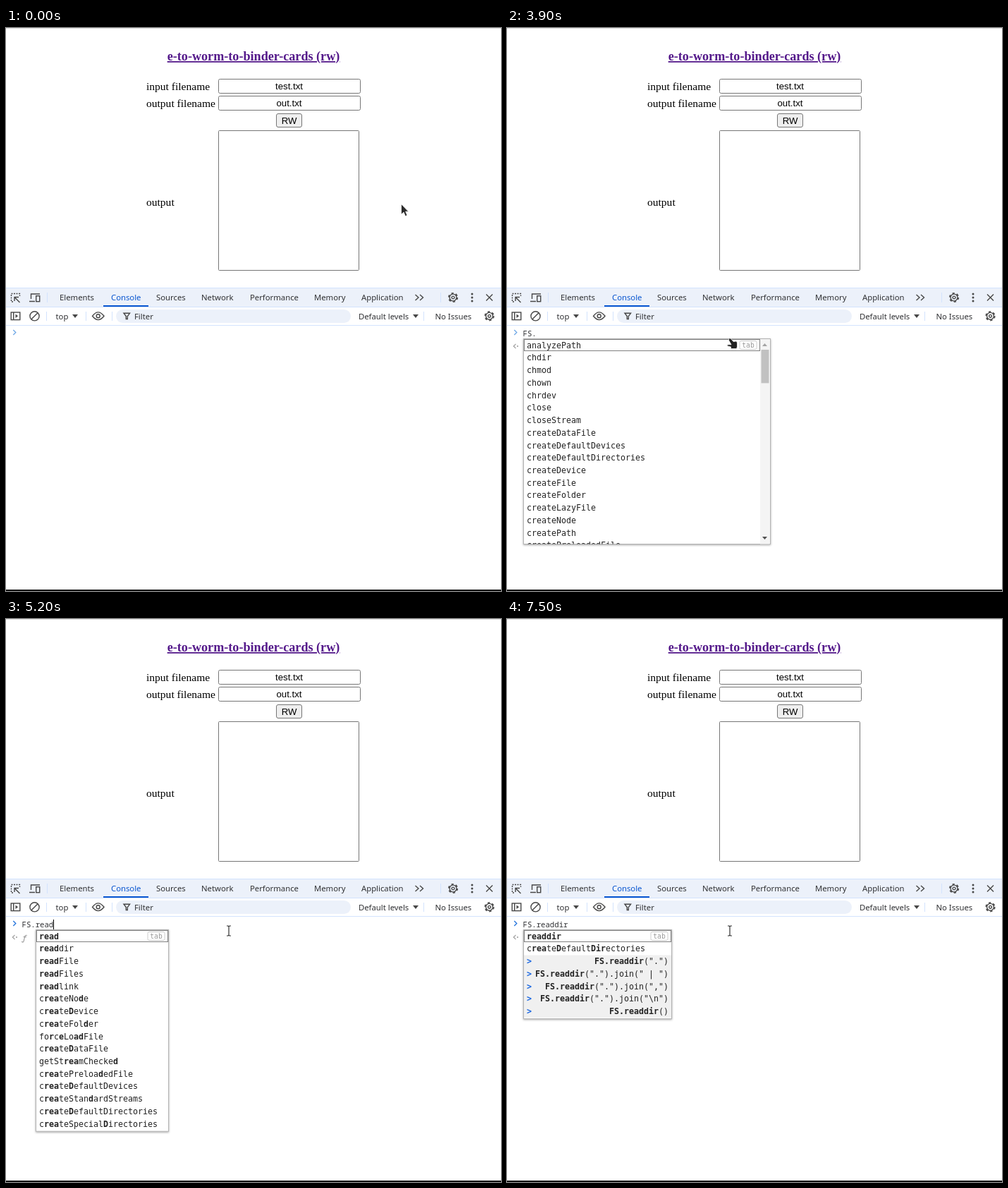
Recreate the animation shown at these times as an HTML page. Size 702 by 798 pixels, loop 8 s.

```html
<!DOCTYPE html>
<html lang="en">
<head>
<meta charset="utf-8">
<title>Console autocomplete</title>
<style>
  html, body { margin: 0; width: 100%; height: 100%; overflow: hidden; background: #fff; }
  svg { display: block; }
  text { white-space: pre; }
  .serif { font: 15.54px "Liberation Serif", serif; }
  .title { font-size: 18.15px; font-weight: bold; fill: #551a8b; text-decoration: underline; }
  .field { font: 13.2px "Liberation Sans", sans-serif; text-anchor: middle; }
  .box { stroke: #767676; }
  .ui { font: 11.3px "Noto Sans", sans-serif; fill: #303134; }
  .ui .active { fill: #0b57d0; }
  .icon { fill: none; stroke: #474747; stroke-width: 1.4; }
  .solid { fill: #474747; }
  .line { stroke: #d3e3fd; }
  .prompt { font: 10.667px "Noto Sans Mono", monospace; fill: #303134; }
  .list { font: 11.63px "DejaVu Sans Mono", monospace; fill: #222; }
  .list .hit { font-weight: bold; }
  .list .mark { font-weight: bold; fill: #1a66e0; }
  .popup { filter: drop-shadow(0 1px 1.5px rgba(0, 0, 0, .35)); }
</style>
</head>
<body>
<svg width="702" height="798" viewBox="0 0 702 798">
  <defs>
    <g id="gear" class="icon">
      <circle r="4.9"/><circle r="1.9"/>
      <circle r="6.2" stroke-width="1.8" stroke-dasharray="3.2 3.293"/>
    </g>
    <path id="down" class="solid" d="M-4-2.5h8l-4 5z"/>
    <path id="arrow" fill="#2b2b2b" stroke="#fff" stroke-width=".8"
      d="M0 0V14.8L3.5 11.6 5.8 17.2 8.5 16.1 6.2 10.7H10.3Z"/>
    <g id="ibeam" fill="none">
      <path stroke="#fff" stroke-width="3" d="M-3-7H-1L0-6 1-7H3M0-6V6M-3 7H-1L0 6 1 7H3"/>
      <path stroke="#333" stroke-width="1.2" d="M-3-7H-1L0-6 1-7H3M0-6V6M-3 7H-1L0 6 1 7H3"/>
    </g>
    <path id="hand" fill="#222" stroke="#fff" stroke-width=".7"
      d="M-.5-2Q1-2.5 2-1L5 2.5 9 2Q10.5 2.5 10.5 5V10L9.5 12.5H1.5V10L-3.5 8.8Q-4.5 6.8-2 6.8H2L-1.5.5Q-2-1.5-.5-2Z"/>
  </defs>

  <path stroke="#dedede" d="M0 .5H702"/>
  <path d="M0 796H702V798H0Z"/>
  <g class="serif">
    <text class="title" x="351" y="46" text-anchor="middle">e-to-worm-to-binder-cards (rw)</text>
    <text x="199" y="88">input filename</text>
    <text x="199" y="112">output filename</text>
    <text x="199" y="252">output</text>
  </g>
  <g class="box" fill="#fff">
    <rect x="301.5" y="72.5" width="201" height="20" rx="2"/>
    <rect x="301.5" y="96.5" width="201" height="20" rx="2"/>
    <rect x="383.5" y="121.5" width="36" height="19" rx="2.5" fill="#efefef"/>
    <rect x="301.5" y="145.5" width="199" height="198" rx="1"/>
  </g>
  <g class="field">
    <text x="401.5" y="87">test.txt</text>
    <text x="401.5" y="111">out.txt</text>
    <text x="401.5" y="136">RW</text>
  </g>

  <path fill="#ecf1fa" d="M0 368H702V395H0Z"/>
  <path class="line" d="M0 368.5H702M0 395.5H702M0 421.5H702M58.5 375V389M616.5 375V389M57.5 402V415M113.5 402V415M150.5 402V415M592.5 402V415"/>
  <path fill="#0b57d0" d="M138 393H202V395H138Z"/>
  <rect x="156" y="399" width="333" height="19" rx="9.5" fill="#ecf1fa"/>
  <g class="ui">
    <text x="76" y="386">Elements</text>
    <text x="149" y="386" class="active">Console</text>
    <text x="213" y="386">Sources</text>
    <text x="277" y="386">Network</text>
    <text x="346" y="386">Performance</text>
    <text x="437" y="386">Memory</text>
    <text x="504" y="386">Application</text>
    <text x="70.5" y="413">top</text>
    <text x="182" y="413">Filter</text>
    <text x="500" y="413">Default levels</text>
    <text x="608.5" y="413">No Issues</text>
  </g>

  <g class="icon">
    <path stroke-dasharray="2 1.5" d="M10 388H7.5V376.5H19.5V380"/>
    <path d="M12 387V381.5H18M12.5 382L19.5 389"/>
    <path d="M35.5 384V377H48M33 387.5H41"/>
    <rect x="42.7" y="379.7" width="5" height="8"/>
    <path d="M580.5 378L585 382 580.5 386M587 378L591.5 382 587 386"/>
    <path d="M681 377.5L690 386.5M690 377.5L681 386.5"/>
    <rect x="7.2" y="403" width="12.6" height="10.6"/>
    <path d="M10.7 403V414"/>
    <circle cx="40.5" cy="408.3" r="6.6"/>
    <path d="M45 403.8L36 412.8"/>
    <path d="M122.5 408.3Q130.7 397.5 139 408.3 130.7 419 122.5 408.3Z"/>
    <circle cx="130.7" cy="408.3" r="2.5"/>
    <path d="M167 404.3H175.5L172.3 408.5V412.5H170.3V408.5Z"/>
  </g>
  <path class="solid" d="M13.5 405.5V411L17 408.3Z"/>
  <g class="solid">
    <circle cx="661" cy="377" r="1.5"/><circle cx="661" cy="382" r="1.5"/><circle cx="661" cy="387" r="1.5"/>
  </g>
  <use href="#gear" x="634" y="382"/>
  <use href="#gear" x="685.5" y="408.3"/>
  <use href="#down" x="98" y="408.5"/>
  <use href="#down" x="581" y="408.5"/>

  <g id="live"></g>
</svg>
<script>
const LOOP = 8000, CHAR = 6.4, PROMPT_X = 22.5;
const LIST_CHAR = 7, ROW = 17.73, TOP = 441, MAX_HEIGHT = 291;

const words = s => s.split(' ');
const globals = words('FS FS_createDataFile FS_createDevice FS_createLazyFile FS_createPath ' +
  'FS_createPreloadedFile FS_getMode FS_handledByPreloadPlugin FS_modeStringToFlags FS_stdin_getChar ' +
  'FS_stdin_getChar_buffer FS_unlink FS_mkdirTree FileSystemHandle FileSystemFileHandle ' +
  'FileSystemDirectoryHandle FileSystemWritableFileStream');
const allMembers = words('analyzePath chdir chmod chown chrdev close closeStream createDataFile ' +
  'createDefaultDevices createDefaultDirectories createDevice createFile createFolder createLazyFile ' +
  'createNode createPath createPreloadedFile');
const members = words('read readdir readFile readFiles readlink registerDevice rename rmdir root ' +
  'createNode createDevice createFolder forceLoadFile createDataFile getStreamChecked createPreloadedFile ' +
  'createDefaultDevices createStandardStreams createDefaultDirectories createSpecialDirectories');
const history = ['FS.read("test.txt")', 'FS.readdir(".")', 'FS.readdir(".").join(" | ")',
  'FS.readdir(".").join(",")', 'FS.readdir(".").join("\\n")', 'FS.readdir()',
  ...['file', 'out.txt', 'test.txt'].map(f => `FS.readFile("${f}", { encoding: 'utf8' })`),
  'FS.rename("a.txt", "b.txt")'];

const hit = s => `<tspan class="hit">${s}</tspan>`;

// Greedy, case-insensitive subsequence match with the matched letters in bold.
function fuzzy(word, query) {
  let n = 0;
  const html = [...word].map(c =>
    n < query.length && c.toLowerCase() === query[n].toLowerCase() ? (n++, hit(c)) : c).join('');
  return { html, matches: n === query.length };
}

function search(query, withHistory = true) {
  const starts = w => w.startsWith(query);
  const loose = query.length > 1 ? members.filter(w => !starts(w) && fuzzy(w, query).matches) : [];
  return {
    query,
    items: [...members.filter(starts), ...loose],
    past: withHistory ? history.filter(h => h.startsWith('FS.' + query)) : [],
    x: withHistory ? 23 : 42
  };
}

const globalList = { query: 'FS', items: globals, past: [], x: 23, width: 350, total: 62 };
const memberList = { query: '', items: allMembers, past: [], x: 23, width: 350, total: 90 };
const grey = s => `<tspan fill="#bcbcbc">${s}</tspan>`;
const object = `{${grey('root:')} FSNode, ${grey('mounts:')} Array(1), ${grey('devices:')} {…}, ` +
  `${grey('streams:')} Array(4), ${grey('nextInode:')} <tspan fill="#7189c4">21</tspan>, …}`;
const func = '<tspan x="22" font-style="italic">ƒ</tspan>';

// time, typed text, suggestions, eager result
const steps = [
  [0, ''],
  [3000, 'F'],
  [3100, 'FS', globalList],
  [3200, 'FS.', globalList, object],
  [3300, 'FS.', memberList, object],
  [3400, 'FS.', memberList, ''],
  [4300, 'FS.r', memberList, ''],
  [4400, 'FS.r', search('r'), ''],
  [4900, 'FS.re', search('r'), ''],
  [5000, 'FS.re', search('re'), ''],
  [5100, 'FS.rea', search('rea'), ''],
  [5200, 'FS.read', search('read', false), func],
  [5300, 'FS.read', search('read'), func],
  [5500, 'FS.readd', search('read'), ''],
  [5600, 'FS.readdi', search('readdi'), ''],
  [5700, 'FS.readdir', search('readdir'), '']
];

function layout({ items, past, x, width, total }) {
  const rows = items.length + past.length;
  const full = rows * ROW + 2;
  const scrolls = full > MAX_HEIGHT;
  const longest = Math.max(...items.map(w => w.length), ...past.map(w => w.length));
  width ??= longest * LIST_CHAR + (past.length ? 21 : 20) + (scrolls ? 14 : 0);
  return { width, height: Math.min(full, MAX_HEIGHT), scrolls, total: total ?? rows,
    right: x + width - (scrolls ? 14 : 0) };
}

function drawPopup(list) {
  const { query, items, past, x } = list;
  const { width, height, scrolls, total, right } = layout(list);
  const baseline = i => Math.floor(454.2 + i * ROW);
  const pastTop = TOP + items.length * ROW;
  const frame = `x="${x + .5}" y="${TOP - .5}" width="${width}" height="${height}"`;
  const prefix = 'FS.' + query;
  const thumb = 260 * 16.4 / total;
  return `<clipPath id="clip"><rect ${frame}/></clipPath>
    <rect class="popup" ${frame} fill="#fff" stroke="#b4b4b4"/>
    <g class="list" clip-path="url(#clip)">
      ${past.length ? `<rect x="${x + 1}" y="${pastTop}" width="${right - x - 1}" height="${past.length * ROW}" fill="#f0f0f0"/>` : ''}
      ${items.map((w, i) => `<text x="${x + 5}" y="${baseline(i)}">${fuzzy(w, query).html}</text>`).join('')}
      ${past.map((w, i) => {
        const y = baseline(items.length + i);
        return `<text class="mark" x="${x + 5}" y="${y}">&gt;</text>
          <text x="${right - 4}" y="${y}" text-anchor="end">${hit(prefix)}${w.slice(prefix.length)}</text>`;
      }).join('')}
      <rect x="${x + 1.5}" y="441.5" width="${right - x - 2}" height="16" fill="none" stroke="#000" stroke-dasharray="1 1"/>
      <rect x="${right - 29}" y="443.5" width="24" height="12" rx="2" fill="#fff" stroke="#ccc"/>
      <text x="${right - 17}" y="453" text-anchor="middle" style="font-size:9.7px;fill:#999">tab</text>
      ${scrolls ? `<rect x="${right}" y="${TOP}" width="13.5" height="${height}" fill="#f4f4f4"/>
        <rect x="${right + 1.5}" y="456" width="11" height="${thumb}" fill="#c1c1c1"/>
        <path fill="#a3a3a3" d="M${right + 3} 451h7l-3.5-4z"/>
        <path fill="#505050" d="M${right + 3} 721h7l-3.5 4z"/>` : ''}
    </g>`;
}

function drawPointer(t, list) {
  const step = Math.min(6, Math.max(0, Math.floor((t - 1000) / 100)));
  const p = step / 6, ease = p * p * (3 - 2 * p);
  const x = 560.5 - 244.5 * ease, y = 249.5 + 192.5 * ease;
  const overText = y > 421 || (x > 301 && x < 501 && y > 145 && y < 344);
  const overList = list && x < list.x + layout(list).width;
  const kind = overList ? 'hand' : overText ? 'ibeam' : 'arrow';
  return `<use href="#${kind}" x="${x}" y="${y}"/>`;
}

const caretShown = t => [[1800, 2400], [3000, 3900], [4300, 6300], [6900, 7500]]
  .some(([from, to]) => t >= from && t < to);

function draw(t) {
  const [, typed, list, result] = steps.findLast(s => s[0] <= t);
  const complete = typed && !typed.endsWith('.');
  const caretX = Math.floor(PROMPT_X + typed.length * CHAR + .3);
  return `<path d="M10.3 428L13.8 431.5 10.3 435" fill="none" stroke-width="1.3" stroke="${complete ? '#2474dc' : '#6fa8e6'}"/>
    <text class="prompt" x="${PROMPT_X}" y="437">${typed}</text>
    ${caretShown(t) ? `<rect x="${caretX}" y="426" width="1" height="14"/>` : ''}
    ${result !== undefined ? `<path d="M12.5 447.8L9.3 451 12.5 454.2" fill="none" stroke="#999" stroke-width="1.1"/>
      <circle cx="15" cy="451" r="1" fill="#999"/>
      <text class="prompt" x="20.6" y="456" style="fill:#858585">${result}</text>` : ''}
    ${list ? drawPopup(list) : ''}
    ${drawPointer(t, list)}`;
}

const live = document.getElementById('live');
let shown = '';
function tick() {
  const html = draw(performance.now() % LOOP);
  if (html !== shown) live.innerHTML = shown = html;
  requestAnimationFrame(tick);
}
tick();
</script>
</body>
</html>
```
